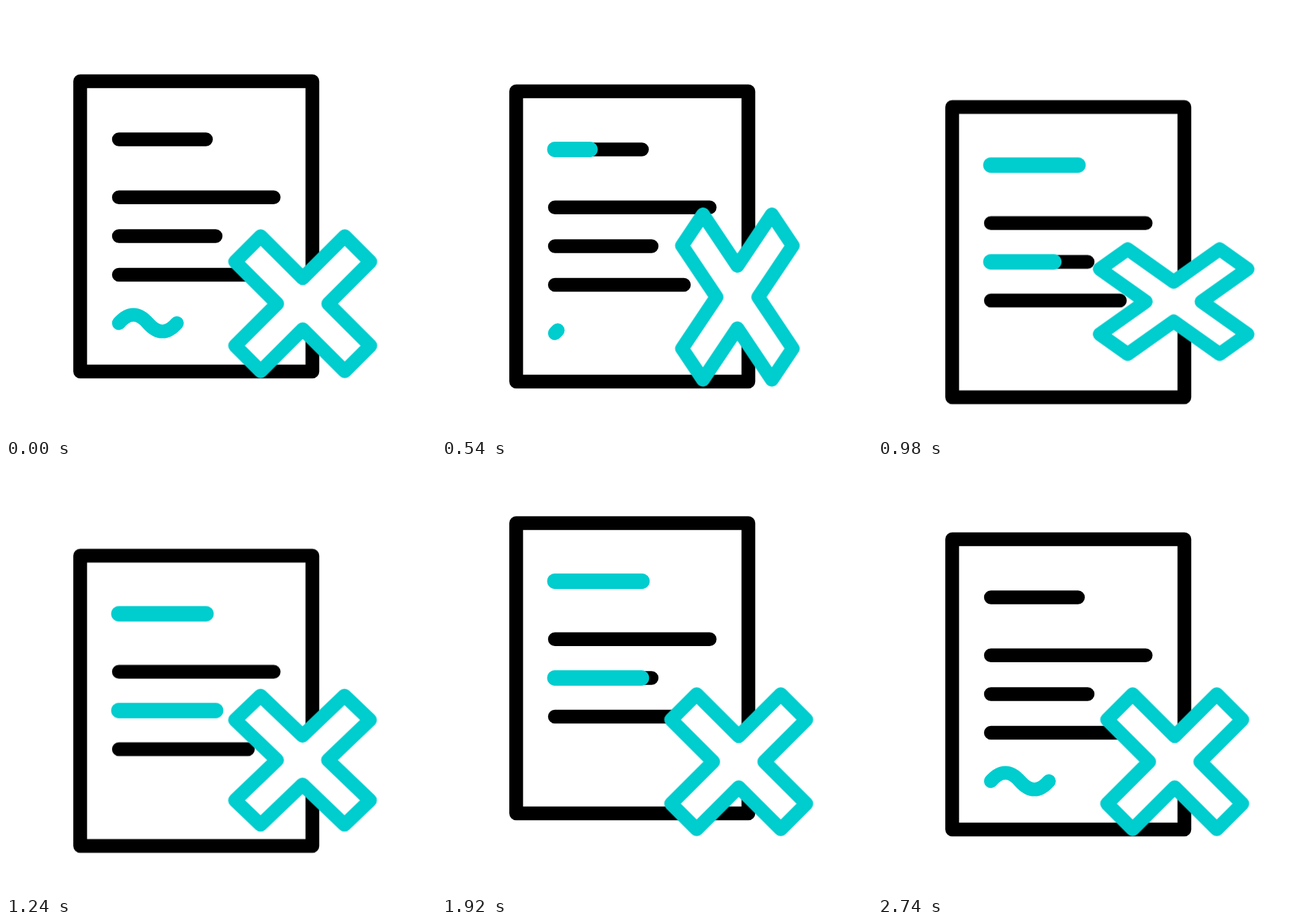
An HTML page that plays this animation: 640 px wide and 640 px high, repeating every 3620 ms.

```html
<!DOCTYPE html>
<html lang="en">
<head>
<meta charset="utf-8">
<title>Rejected document</title>
<style>
  html, body { margin: 0; width: 100%; height: 100%; overflow: hidden; background: #fff; }
  svg {
    display: block; width: 640px; height: 640px;
    fill: none; stroke: #000; stroke-width: 20.48;
    stroke-linecap: round; stroke-linejoin: round;
  }
  .teal { stroke: #00cdce; }
  .wide { stroke-width: 23; }
  .trim { stroke-dasharray: 1 2; }

  .doc, .cross, .trim { animation: 3620ms cubic-bezier(.333, 0, .667, 1) infinite; }
  .doc { animation-name: sway; }
  .cross { animation-name: squash; fill: #fff; vector-effect: non-scaling-stroke; }
  .title { animation-name: title; }
  .row { animation-name: row; }
  .sign { animation-name: sign; }
  .sparks path { animation-name: spark; }
  .sparks { animation: fade 3620ms cubic-bezier(.333, 0, .667, 1) infinite; }

  @keyframes sway {
    0%, 5.525% { transform: translateY(0); }
    27.624% { transform: translateY(38.4px); }
    49.724% { transform: translateY(-25.6px); }
    71.823%, 100% { transform: translateY(0); }
  }
  @keyframes squash {
    0% { transform: translate(441.6px, 443.1px) scale(1, 1); }
    5.525% {
      transform: translate(441.6px, 443.1px) scale(1, 1);
      animation-timing-function: cubic-bezier(.333, .58, .667, 1);
    }
    16.575% { transform: translate(439.6px, 432.9px) scale(.814, 1.229); }
    27.624% { transform: translate(440px, 440px) scale(1.095, .772); }
    38.674% { transform: translate(442px, 441.2px) scale(.946, 1.053); }
    49.724%, 100% { transform: translate(441.6px, 443.1px) scale(1, 1); }
  }
  @keyframes title {
    0%, 7.735% { stroke-dashoffset: 1; visibility: hidden; }
    24.309%, 59.116% { stroke-dashoffset: 0; visibility: visible; }
    75.691%, 100% { stroke-dashoffset: 1; visibility: hidden; }
  }
  @keyframes row {
    0%, 17.127% { stroke-dashoffset: 1; visibility: hidden; }
    33.702%, 49.724% { stroke-dashoffset: 0; visibility: visible; }
    66.298%, 100% { stroke-dashoffset: 1; visibility: hidden; }
  }
  @keyframes sign {
    0%, 5.525% { stroke-dashoffset: 0; visibility: visible; }
    16.575%, 64.641% { stroke-dashoffset: 1; visibility: hidden; }
    75.691%, 100% { stroke-dashoffset: 0; visibility: visible; }
  }
  /* Grow outwards, then the tail catches up with the tip */
  @keyframes spark {
    0%, 36.74% { stroke-dashoffset: 1; visibility: hidden; }
    47.79% { stroke-dashoffset: 0; visibility: visible; }
    52.21%, 100% { stroke-dashoffset: -1; visibility: hidden; }
  }
  @keyframes fade {
    0%, 36.74% { opacity: 0; }
    42.265%, 47.79% { opacity: 1; }
    52.21%, 100% { opacity: 0; }
  }
</style>
</head>
<body>
<svg viewBox="0 0 640 640">
  <g class="doc">
    <rect x="110.4" y="112" width="345.6" height="432"/>
    <path d="M168 198.4H297.6M168 284.8H398.4M168 342.4H312M168 400H360"/>
    <path class="teal wide trim title" pathLength="1" d="M168 198.4H297.6"/>
    <path class="teal wide trim row" pathLength="1" d="M168 342.4H312"/>
    <path class="teal trim sign" pathLength="1"
      d="M168 472C182.4 455.5 196.8 455.5 211.2 472S240 488.5 254.4 472"/>
  </g>
  <path class="teal cross"
    d="M0-38L62.6-100.6L100.6-62.6L38 0L100.6 62.6L62.6 100.6L0 38L-62.6 100.6L-100.6 62.6L-38 0L-100.6-62.6L-62.6-100.6Z"/>
  <g class="teal sparks">
    <path class="trim" pathLength="1" d="M559.3 442.7h27"/>
    <path class="trim" pathLength="1" d="M321.4 443h-27"/>
    <path class="trim" pathLength="1" d="M331.5 343l-18-18"/>
    <path class="trim" pathLength="1" d="M544.5 338l18-18"/>
    <path class="trim" pathLength="1" d="M326 548l-18 18"/>
    <path class="trim" pathLength="1" d="M546 550l18 18"/>
  </g>
</svg>
</body>
</html>
```
